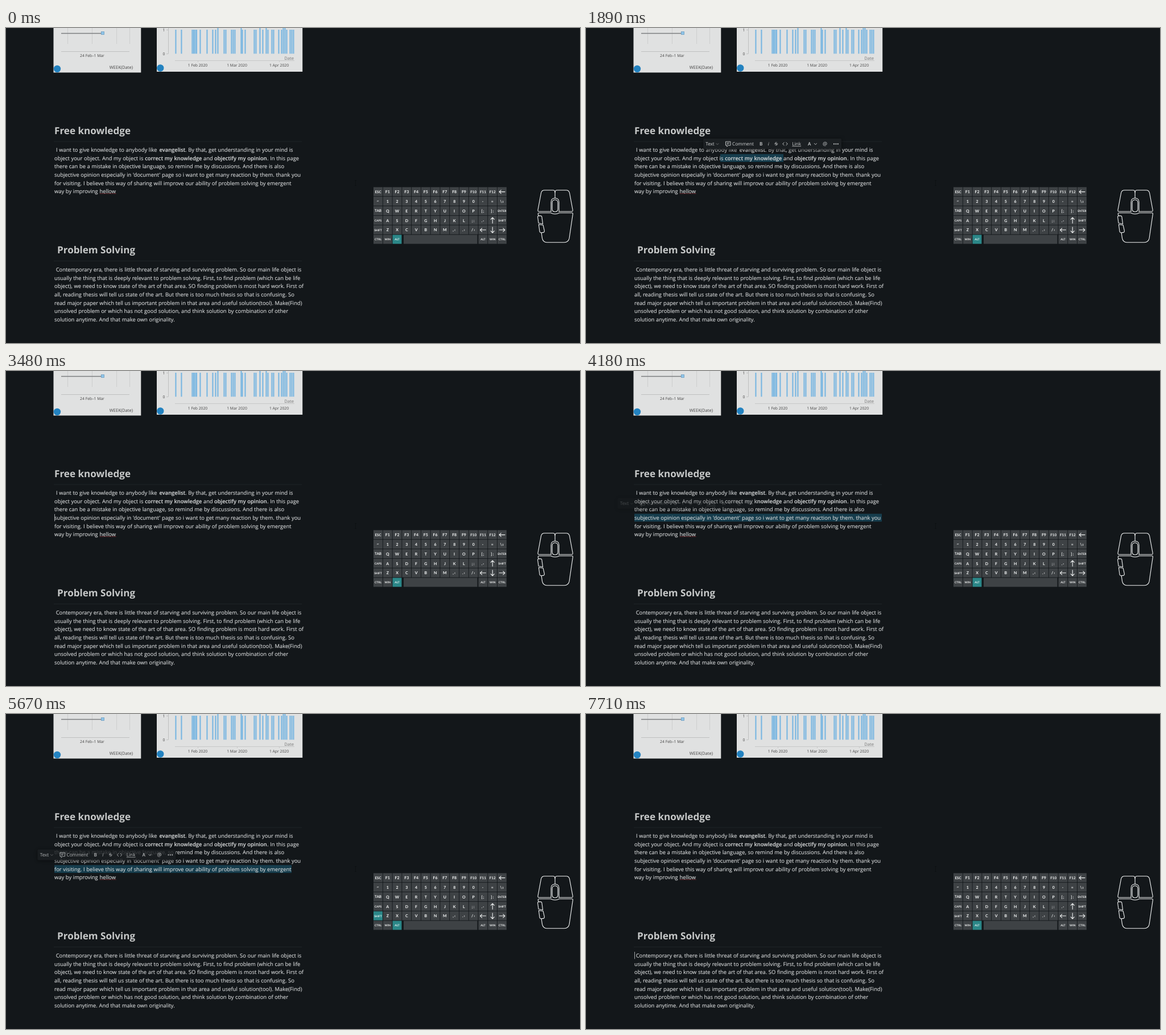
An HTML page for the animation above (8.15 s loop, 1009 by 555 pixels).

```html
<!DOCTYPE html>
<html lang="en">
<head>
<meta charset="utf-8">
<title>Moving through notes with the keyboard</title>
<style>
html, body { margin: 0; width: 100%; height: 100%; overflow: hidden; background: #13171a; }
svg { display: block; width: 1009px; height: 555px; font-family: "Open Sans", "Noto Sans", sans-serif; text-rendering: geometricPrecision; }
.body { font-size: 9.38px; word-spacing: .2px; fill: #d2d4d5; stroke: #d2d4d5; stroke-width: .15px; }
.head { font-size: 17.1px; font-weight: 700; fill: #c6c8c8; }
.bold { font-weight: 600; }
.chart { font-size: 6.8px; fill: #444; }
.key text { font-family: Lato, sans-serif; font-weight: 700; fill: #f6f8f8; text-anchor: middle; }
.key rect { fill: #3e4245; }
.key.on rect { fill: #2b8788; }
.line { fill: none; stroke: #f2f4f4; stroke-width: 1.1; stroke-linecap: round; stroke-linejoin: round; }
#bar { font-size: 8.2px; fill: #d2d4d5; }
#bar path { fill: none; stroke: #d2d4d5; stroke-width: .9; }
#barBox { fill: #1b1f22; filter: drop-shadow(0 1px 3px rgba(0, 0, 0, .55)); }
</style>
</head>
<body>
<svg id="stage" viewBox="0 0 1009 555"></svg>
<script>
const LOOP = 8150;
const STEP = 14.68;
const $ = id => document.getElementById(id);
const esc = s => s.replace(/&/g, '&amp;').replace(/</g, '&lt;');
const text = (x, y, s, cls = '', more = '') =>
  `<text x="${x}" y="${y}" class="${cls}" ${more}>${esc(s)}</text>`;
const rect = (x, y, w, h, fill, more = '') =>
  `<rect x="${x}" y="${y}" width="${w}" height="${h}" fill="${fill}" ${more}/>`;
const path = (d, more = '') => `<path d="${d}" ${more}/>`;

// ---- charts ----
function charts() {
  const bars = [298, 308, 327, 329.5, 332, 334.5, 341, 353, 363, 368, 372, 383, 386, 396, 399, 402,
    413, 415, 420, 436, 439, 446, 451, 457, 460, 467, 470, 479, 484, 487, 490, 493, 499, 502, 505];
  const tall = [372, 413, 446, 457, 487, 490];
  return rect(83.5, 0, 153.8, 78.5, '#e0e1e1') + rect(265, 0, 256.2, 77, '#e0e1e1') +
    path('M108.5 0V28M151.5 0V28M194.5 0V28M217.5 0V28', 'stroke="#cdcece" fill="none"') +
    path('M97 41.5H217', 'stroke="#bfc0c0" fill="none"') +
    path('M97 9.5H168', 'stroke="#7b7d7f" stroke-width="1.4" fill="none"') +
    rect(167.5, 6.5, 5, 5, '#8fc4e8', 'stroke="#6f9fc0" stroke-width=".8"') +
    text(151.5, 50.5, '24 Feb–1 Mar', 'chart', 'text-anchor="middle"') +
    text(223, 71.5, 'WEEK(Date)', 'chart', 'text-anchor="end" style="font-size:7.6px"') +
    path('M285.5 0V45.5M282 3.5H285M282 45.5H285', 'stroke="#bfc0c0" fill="none"') +
    path('M297 57.5H507M337.5 57V60M406.5 57V60M480.5 57V60', 'stroke="#c6c7c7" fill="none"') +
    bars.map(x => {
      const top = tall.includes(x) ? 0 : 3;
      return rect(x - .6, top, 2.1, 42.3 + 3 - top, '#78b6e1');
    }).join('') +
    text(275.5, 6, '1', 'chart') + text(275.5, 47.5, '0', 'chart') +
    text(506, 56.3, 'Date', 'chart', 'text-anchor="end" style="font-size:7.6px;fill:#777"') +
    [[337, '1 Feb 2020'], [406, '1 Mar 2020'], [480, '1 Apr 2020']]
      .map(([x, s]) => text(x, 68, s, 'chart', 'text-anchor="middle"')).join('') +
    '<circle cx="90" cy="72" r="6.2" fill="#2382c0"/><circle cx="271.3" cy="70.5" r="6.2" fill="#2382c0"/>';
}

// ---- page text: lines of [x, words, bold?] parts ----
const FREE = [
  [[88, 'I want to give knowledge to anybody like'], [269.5, 'evangelist', 1], [315, '. By that, get understanding in your mind is']],
  [[85, 'object your object. And my object is'], [244.2, 'correct my knowledge', 1], [347, 'and'], [366, 'objectify my opinion', 1], [459, '. In this page']],
  [[85, 'there can be a mistake in objective language, so remind me by discussions. And there is also']],
  [[85, "subjective opinion especially in 'document' page so i want to get many reaction by them. thank you"]],
  [[85, 'for visiting. I believe this way of sharing will improve our ability of problem solving by emergent']],
  [[85, 'way by improving'], [164.6, 'hellow']]
];
const SOLVE = [
  'Contemporary era, there is little threat of starving and surviving problem. So our main life object is',
  'usually the thing that is deeply relevant to problem solving. First, to find problem (which can be life',
  'object), we need to know state of the art of that area. SO finding problem is most hard work. First of',
  'all, reading thesis will tell us state of the art. But there is too much thesis so that is confusing. So',
  'read major paper which tell us important problem in that area and useful solution(tool). Make(Find)',
  'unsolved problem or which has not good solution, and think solution by combination of other',
  'solution anytime. And that make own originality.'
].map((s, i) => [[i ? 85 : 87.7, s]]);

const para = (lines, y) => lines.map((parts, i) => parts.map(([x, s, b]) =>
  text(x, y + i * STEP, s, b ? 'body bold' : 'body')).join('')).join('');

// ---- keyboard ----
const KEY_W = 16.77;
const ROWS = [
  'ESC F1 F2 F3 F4 F5 F6 F7 F8 F9 F10 F11 F12 ←',
  '~ 1 2 3 4 5 6 7 8 9 0 - = \\ı',
  'TAB Q W E R T Y U I O P [; ]: ENTER',
  'CAPS A S D F G H J K L ;: .· ↑ SHIFT',
  'SHIFT Z X C V B N M ,‹ .› /‹ ← ↓ →',
  'CTRL WIN ALT SPACE - - - - - - - ALT WIN CTRL'
];
const ARROWS = { '←': 0, '↑': 90, '→': 180, '↓': 270 };

function label(s, cx, cy, row) {
  if (s in ARROWS) {
    return `<g transform="translate(${cx} ${cy}) rotate(${ARROWS[s]})">` +
      path('M5 0H-5M-1.8 -3L-5 0L-1.8 3', 'class="line"') + '</g>';
  }
  let size = s.length > 3 ? 4.9 : s.length === 3 ? 6.3 : 7;
  if (row === 5) size = 4.9;
  const lone = /^[A-Z0-9]/.test(s) ? '' : 'letter-spacing="1"';
  return text(cx, cy + size * .36 - (s === '~' ? 1 : 0), s, '', `font-size="${size}" ${lone}`);
}

function keyboard() {
  let out = '';
  ROWS.forEach((line, r) => line.split(' ').forEach((s, c) => {
    if (r === 5 && c > 3 && c < 11) return;
    const x = 646 + c * KEY_W, y = 280.4 + r * 16.8;
    const space = s === 'SPACE';
    const box = space ? rect(699, y, 129.5, 15.9, '') : rect(x, y, 15.9, 15.9, '');
    out += `<g class="key" id="k${r}_${c}">${box}${space ? '' : label(s, x + 8, y + 8.2, r)}</g>`;
  }));
  return out;
}

// ---- mouse ----
const mouse = () => '<g class="line" transform="translate(-.4 -.3)">' + [
  'M958.5 323.5H937Q935 323.5 935.4 321L941 291Q942 286 947 286H962Q965.5 286 965.5 290V300',
  'M972.5 323.5H995Q997 323.5 996.6 321L991 291Q990 286 985 286H969Q965.5 286 965.5 290',
  'M958.5 323.5V307Q958.5 300 965.5 300T972.5 307V323.5',
  'M960.5 308Q960.5 303 965.5 303T970.5 308V319Q970.5 324 965.5 324T960.5 319Z',
  'M936.5 331L935.6 328Q935.6 326 938 326H958Q965.5 330 973 326H995Q997 326 996.8 328L990.5 371Q989 378 982 378H951Q944.5 378 943 371L941.5 361',
  'M935 333Q935 331.3 937 331.2L940 331Q942 331 942.3 333L944 345.5L936.5 344Z',
  'M936.8 346.5L944.5 347.5L946.8 357.5Q947 360.5 944 360.7L941 361Q939 361 938.5 359Z'
].map(d => path(d)).join('') + '</g>';

// ---- floating format bar, drawn from its own corner ----
const bar = () => '<g id="bar"><rect id="barBox" width="243" height="18.7" rx="2"/>' +
  text(4.2, 12.3, 'Text') + path('M22.8 8.6l2.2 2.2l2.2-2.2', 'style="stroke:#77797b"') +
  path('M39.5 5.5h8.5v6.6h-4l-2.3 2.3v-2.3h-2.2zM41.5 8h4.6M41.5 10h3') +
  text(51, 12.3, 'Comment') +
  text(99, 12.3, 'B', 'bold', 'id="boldMark"') +
  text(113.8, 12.3, 'i', '', 'font-style="italic"') +
  text(126, 12.3, 'S') + path('M125.3 9.4h6') +
  path('M142.5 6.8l-2.8 2.7l2.8 2.7M145.5 6.8l2.8 2.7l-2.8 2.7') +
  text(156.3, 12.3, 'Link') + path('M156.3 13.8h15.8', 'style="stroke-width:.7"') +
  text(184, 12.3, 'A', 'bold') + path('M195 8.4l2.4 2.4l2.4-2.4') +
  text(210, 12.3, '@', '', 'font-size="9"') +
  [230, 233.4, 236.8].map(x => `<circle cx="${x}" cy="9.6" r="1.1"/>`).join('') + '</g>';

$('stage').innerHTML = rect(0, 0, 1009, 555, '#13171a') + charts() +
  rect(84, 199.5, 436, 1, '#1f2427') + rect(84, 410, 436, 1, '#1f2427') +
  rect(0, 0, 0, 13.8, '#163d4d', 'id="sel"') +
  text(85, 186.7, 'Free knowledge', 'head') + text(90, 397.4, 'Problem Solving', 'head') +
  para(FREE, 218) + para(SOLVE, 429) +
  path('M165 291.8H194', 'stroke="#a8343a" stroke-width="1" stroke-dasharray="1.2 1" fill="none"') +
  rect(0, 0, 1, 12.6, '#a3a6a8', 'id="caret"') +
  path('M613 268.5h3M614.5 268.5v9M613 277.5h3', 'stroke="#0d1113" fill="none"') +
  keyboard() + mouse() + bar();

// ---- timeline ----
const lineY = n => 214.5 + (n - 1) * STEP;
const KEYS = { alt: 'k5_2', shift: 'k4_0', J: 'k3_7', K: 'k3_8', L: 'k3_9' };
// sel: [left, right, line], bar: [left, line], caret: [x, centre y]
const STEPS = [
  [0, { keys: 'alt', sel: null, caret: null, bar: null }],
  [130, { keys: 'alt L', caret: [346.5, lineY(2)] }],
  [240, { keys: 'alt' }],
  [380, { keys: 'alt shift' }],
  [470, { keys: 'alt shift J' }],
  [560, { sel: [295, 347, 2], caret: null, bar: [265, 2] }],
  [740, { keys: 'alt shift' }],
  [1270, { keys: 'alt shift J', sel: [278, 347, 2], bar: [248, 2] }],
  [1340, { keys: 'alt shift' }],
  [1410, { keys: 'alt shift J', sel: [245, 347, 2], bar: [215, 2] }],
  [1490, { keys: 'alt shift' }],
  [1560, { keys: 'alt shift J', sel: [236, 347, 2], bar: [206, 2] }],
  [1650, { keys: 'alt shift' }],
  [1820, { keys: 'alt' }],
  [1900, { keys: 'alt K', sel: null, caret: [85, lineY(3)] }],
  [2080, { keys: 'alt' }],
  [2240, { keys: 'alt shift' }],
  [2320, { sel: [85, 489, 3], caret: null, bar: [55.5, 3] }],
  [2630, { keys: 'alt' }],
  [2930, { keys: '' }],
  [3020, { keys: 'alt' }],
  [3170, { keys: 'alt K', sel: null, caret: [85, lineY(4)] }],
  [3310, { keys: 'alt' }],
  [3950, { keys: 'alt shift' }],
  [4050, { sel: [85, 520, 4], caret: null, bar: [55.5, 4] }],
  [4180, { keys: 'alt' }],
  [4420, { keys: 'alt K', sel: null, caret: [85, lineY(5)] }],
  [4560, { keys: 'alt' }],
  [4960, { keys: 'alt K' }],
  [5040, { keys: 'alt' }],
  [5280, { keys: 'alt shift' }],
  [5440, { sel: [85, 502, 5], caret: null, bar: [55.5, 5] }],
  [5920, { keys: 'alt' }],
  [6080, { keys: 'alt K' }],
  [6390, { keys: 'alt', sel: null, caret: [85, lineY(5)] }],
  [6680, { keys: 'alt K', caret: [85, lineY(6)] }],
  [6840, { keys: 'alt' }],
  [6920, { keys: 'alt K', caret: [85, 308] }],
  [7000, { keys: 'alt' }],
  [7080, { keys: 'alt K', caret: [85, 336] }],
  [7160, { keys: 'alt' }],
  [7240, { keys: 'alt K', caret: [85, 357] }],
  [7320, { keys: 'alt' }],
  [7400, { keys: 'alt K', caret: [89.5, 391] }],
  [7480, { keys: 'alt' }],
  [7620, { keys: 'alt K', caret: [85, 425.5] }],
  [7710, { keys: 'alt' }]
];
// bar fades: [in from, in to, out from, out to]
const FADES = [
  [640, 820, 1900, 2080], [2400, 2580, 3170, 3380], [4150, 4270, 4420, 4600], [5520, 5700, 6390, 6600]
];
const clamp = v => Math.max(0, Math.min(1, v));
const opacityAt = t => Math.max(...FADES.map(([a, b, c, d]) =>
  Math.min(clamp((t - a) / (b - a)), clamp((d - t) / (d - c)))));

function stateAt(t) {
  const state = {};
  for (const [at, change] of STEPS) {
    if (at > t) break;
    Object.assign(state, change);
  }
  return state;
}

function place(el, x, y) {
  el.setAttribute('x', x);
  el.setAttribute('y', y);
}

function draw(t) {
  const s = stateAt(t);
  const held = s.keys.split(' ');
  for (const k in KEYS) $(KEYS[k]).classList.toggle('on', held.includes(k));

  $('sel').setAttribute('width', s.sel ? s.sel[1] - s.sel[0] : 0);
  if (s.sel) place($('sel'), s.sel[0], lineY(s.sel[2]) - 7);

  $('caret').style.opacity = s.caret ? 1 : 0;
  if (s.caret) place($('caret'), s.caret[0], s.caret[1] - 6.5);

  $('bar').style.opacity = s.bar ? opacityAt(t) : 0;
  if (s.bar) {
    $('bar').setAttribute('transform', `translate(${s.bar[0]} ${lineY(s.bar[1]) - 34.5})`);
    $('boldMark').style.fill = s.bar[0] > 210 ? '#2a8c98' : '';
  }
}

const start = performance.now();
function tick() {
  draw((performance.now() - start) % LOOP);
  requestAnimationFrame(tick);
}
tick();
</script>
</body>
</html>
```
